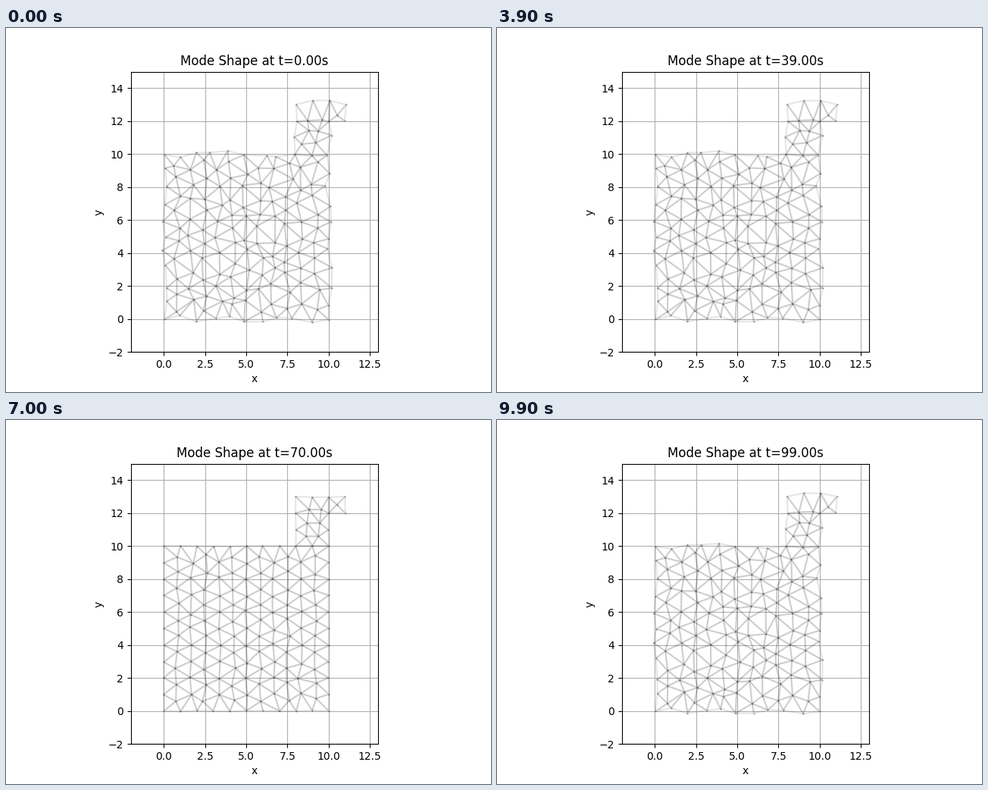
These frames come from a looping animation (640 by 480 pixels, 10 s). A matplotlib script:

```python
import numpy as np
import matplotlib.pyplot as plt
from matplotlib.animation import FuncAnimation
from matplotlib.collections import PolyCollection
from matplotlib.tri import Triangulation

FRAMES = 100
OMEGA = np.radians(119.67)  # phase advance per second of model time
CORNERS = [(0, 0), (10, 0), (10, 12), (11, 12), (11, 13), (8, 13), (8, 10), (0, 10)]


def outline():
    """Nodes at unit spacing along the domain boundary."""
    nodes = []
    for a, b in zip(CORNERS, CORNERS[1:] + CORNERS[:1]):
        a, b = np.array(a, float), np.array(b, float)
        n = int(np.abs(b - a).max())
        nodes += [a + (b - a) * k / n for k in range(n)]
    return np.array(nodes)


def interior(rng):
    """Staggered columns in the square, slanted pairs in the tower."""
    nodes = []
    for col in range(1, 12):
        ys = np.linspace(.65, 9.35, 10) if col % 2 else np.arange(1, 10)
        nodes += [(col * 10 / 12, y) for y in ys]
    nodes = np.array(nodes)
    nodes += rng.normal(0, .06, nodes.shape)
    tower = [(8.6 + .75 * c + .1 * r, 10.6 + .8 * r) for r in range(3) for c in range(2)]
    return np.vstack([nodes, tower, [(9, 10), (10.5, 12.5)]])


def mode_shape(nodes, rng):
    """Random displacement per node; the corners hardly move."""
    angle = rng.uniform(0, 2 * np.pi, len(nodes))
    size = rng.uniform(.08, .28, len(nodes))
    size[[tuple(p) in CORNERS for p in nodes]] *= .2
    return size[:, None] * np.column_stack([np.cos(angle), np.sin(angle)])


def inside(x, y):
    return (y < 10) & (x < 10) | (x > 8) & (x < 10) | (x > 10) & (y > 12)


rng = np.random.default_rng(8)
base = np.vstack([outline(), interior(rng)])
mode = mode_shape(base, rng)

cells = Triangulation(*base.T).triangles
cells = cells[inside(*base[cells].mean(axis=1).T)]

fig, ax = plt.subplots(figsize=(6.4, 4.8), dpi=100)
ax.set_aspect("equal")
ax.set(xlim=(-2, 13), ylim=(-2, 15), xlabel="x", ylabel="y")
ax.grid(True)
title = ax.set_title("Mode Shape at t=0.00s")
mesh = PolyCollection(base[cells], facecolors="none", edgecolors=(0, 0, 0, .1),
                      linewidths=1.5, joinstyle="round", zorder=2)
ax.add_collection(mesh, autolim=False)
dots = ax.scatter(*base.T, s=2.5, color="black", alpha=.3, linewidths=0, zorder=3)


def update(t):
    nodes = base + mode * np.cos(OMEGA * t)
    mesh.set_verts(nodes[cells])
    dots.set_offsets(nodes)
    title.set_text(f"Mode Shape at t={t:.2f}s")
    return mesh, dots, title


anim = FuncAnimation(fig, update, frames=FRAMES, interval=100,
                     repeat=True, repeat_delay=0)
plt.show()
```
